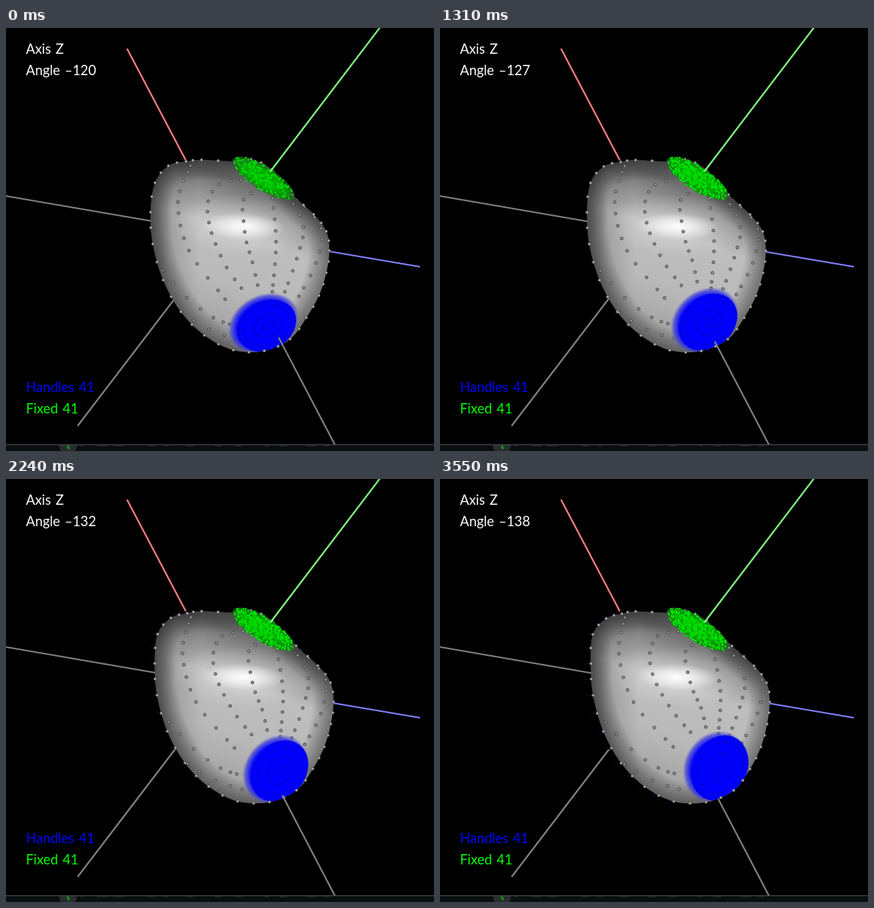
Write an HTML page with a canvas that moves like this. It is 580 by 574 pixels and loops after 3640 ms.

```html
<!DOCTYPE html>
<html lang="en">
<head>
<meta charset="utf-8">
<title>Surface deformation</title>
<style>
  html, body { margin: 0; width: 100%; height: 100%; overflow: hidden; background: #000; }
  canvas, svg { position: absolute; left: 0; top: 0; display: block; }
  text { font: 18.4px Lato, "Open Sans", sans-serif; word-spacing: 1.5px; }
</style>
</head>
<body>
<canvas id="view" width="580" height="574"></canvas>
<svg width="580" height="574">
  <text x="27" y="35" fill="#fff">Axis Z</text>
  <text x="27" y="64" fill="#fff" id="angle">Angle –120</text>
  <text x="27" y="494" fill="#00f">Handles 41</text>
  <text x="27" y="523" fill="#0f0">Fixed 41</text>
</svg>
<script>
const LOOP = 3640;
const STEPS = [70, 220, 450, 620, 850, 1080, 1310, 1460, 1630, 1860,
  2090, 2240, 2570, 2780, 2930, 3090, 3320, 3550];
const ctx = document.getElementById('view').getContext('2d');
const label = document.getElementById('angle');
const TAU = Math.PI * 2;

const OUTLINE = [
  [244, 181], [265, 179], [310, 181], [332, 178], [360, 192], [388, 226], [417, 253], [434, 276],
  [438, 302], [434, 332], [424, 363], [407, 393], [385, 422], [350, 438], [308, 437], [269, 417],
  [237, 385], [213, 342], [199, 293], [196, 250], [202, 210], [220, 187]
];
// Each row: dots per span, then the control points.
const MERIDIANS = [
  [4, [250, 187], [233, 236], [248, 302], [297, 368]],
  [2, [318, 206], [289, 212], [274, 235], [275, 264], [284, 293], [299, 325], [319, 353]],
  [2, [343, 219], [322, 233], [322, 262], [326, 291], [334, 318], [341, 349]],
  [5, [360, 222], [366, 290], [361, 358]],
  [3, [383, 228], [403, 270], [394, 313], [378, 358]],
  [3, [395, 232], [427, 272], [420, 319], [397, 364]],
  [2, [213, 329], [245, 366], [281, 393], [303, 402]],
  [2, [238, 386], [275, 409], [312, 422]]
];

const mix = (a, b, p) => a + (b - a) * p;
const bump = (x, y, cx, cy, spread) => Math.exp(-((x - cx) ** 2 + (y - cy) ** 2) / spread);

// Sideways drift that fades out toward the fixed top.
function drift(y) {
  const t = Math.max(0, Math.min(1, (y - 178) / 60));
  return 8.5 * t * t * (3 - 2 * t);
}

const outlineAt = p => OUTLINE.map(([x, y]) => [
  x + p * (drift(y) + 5 * bump(x, y, 400, 410, 3500) + 5 * bump(x, y, 225, 185, 500)),
  y + p * (0.5 + 2 * bump(x, y, 228, 186, 700))
]);

const meridianAt = (pts, p) => pts.map(([x, y]) => [
  x + p * (drift(y) + 13 * bump(x, y, 310, 335, 6000)),
  y + p * (1 - 14 * bump(x, y, 350, 355, 3200))
]);

function spline(pts, sub, closed) {
  const n = pts.length, out = [];
  const at = i => closed ? pts[(i + n) % n] : pts[Math.max(0, Math.min(n - 1, i))];
  for (let i = 0; i < (closed ? n : n - 1); i++) {
    const [a, b, c, d] = [at(i - 1), at(i), at(i + 1), at(i + 2)];
    for (let j = 0; j < sub; j++) {
      const t = j / sub;
      out.push([0, 1].map(k => b[k] + t / 2 * (c[k] - a[k]
        + t * (2 * a[k] - 5 * b[k] + 4 * c[k] - d[k]
        + t * (3 * (b[k] - c[k]) + d[k] - a[k])))));
    }
  }
  if (!closed) out.push(pts[n - 1]);
  return out;
}

function line(x1, y1, x2, y2, color, width = 2.2) {
  ctx.strokeStyle = color;
  ctx.lineWidth = width;
  ctx.beginPath();
  ctx.moveTo(x1, y1);
  ctx.lineTo(x2, y2);
  ctx.stroke();
}

function dots(pts, r, fill, rim) {
  ctx.fillStyle = fill;
  ctx.strokeStyle = rim;
  ctx.lineWidth = 0.9;
  for (const [x, y] of pts) {
    ctx.beginPath();
    ctx.arc(x, y, r, 0, TAU);
    ctx.fill();
    if (rim) ctx.stroke();
  }
}

function glow(x, y, rx, ry, rot, stops) {
  ctx.save();
  ctx.translate(x, y);
  ctx.rotate(rot);
  ctx.scale(rx, ry);
  const g = ctx.createRadialGradient(0, 0, 0, 0, 0, 1);
  stops.forEach(([at, color]) => g.addColorStop(at, color));
  ctx.fillStyle = g;
  ctx.beginPath();
  ctx.arc(0, 0, 1, 0, TAU);
  ctx.fill();
  ctx.restore();
}

function ramp(x1, y1, x2, y2, stops) {
  const g = ctx.createLinearGradient(x1, y1, x2, y2);
  stops.forEach(([at, color]) => g.addColorStop(at, color));
  ctx.fillStyle = g;
  ctx.fillRect(0, 0, 580, 574);
}

function random(seed) {
  return () => (seed = seed * 16807 % 2147483647) / 2147483647;
}

function axes() {
  line(296, 279, 164, 28, '#ff8080');
  line(296, 279, 0, 228, '#808080');
  line(296, 279, 561, 324, '#8080ff');
  line(296, 279, 97, 540, '#808080');
}

function body(p) {
  const shape = new Path2D();
  spline(outlineAt(p), 8, true).forEach(([x, y]) => shape.lineTo(x, y));
  shape.closePath();
  ctx.save();
  ctx.clip(shape);
  const s = 8 * p;
  ramp(330 + s, 185, 244 + s, 430, [[0, '#727272'], [0.1, '#6c6c6c'], [0.22, '#939393'],
    [0.36, '#bebebe'], [0.62, '#bababa'], [1, '#989898']]);
  ramp(196 + s, 0, 262 + s, 0, [[0, 'rgba(0,0,0,.36)'], [0.4, 'rgba(0,0,0,.15)'], [1, 'rgba(0,0,0,0)']]);
  ctx.strokeStyle = 'rgba(0,0,0,.035)';
  for (let w = 3; w < 56; w += 4) {
    ctx.lineWidth = w;
    ctx.stroke(shape);
  }
  glow(322, 268, 98, 42, 0.05, [[0, 'rgba(255,255,255,.45)'], [0.5, 'rgba(255,255,255,.2)'], [1, 'rgba(255,255,255,0)']]);
  glow(322, 269, 56, 18, 0.05, [[0, 'rgba(255,255,255,.95)'], [0.4, 'rgba(255,255,255,.6)'], [1, 'rgba(255,255,255,0)']]);
  MERIDIANS.forEach(([sub, ...pts]) => dots(spline(meridianAt(pts, p), sub), 1.9, '#999', '#383838'));
  handle(p);
  ctx.restore();
}

function handle(p) {
  const rot = mix(-0.5, -1.1, p);
  glow(mix(349, 374, p), mix(401, 391, p), 51, mix(39, 44, p), rot,
    [[0, '#00f'], [0.76, '#1414f4'], [0.9, 'rgba(60,60,220,.7)'], [1, 'rgba(110,110,200,0)']]);
  const x = mix(353, 379, p), y = mix(404, 392, p);
  const rx = mix(42, 46, p), ry = mix(33, 37, p);
  const cos = Math.cos(rot), sin = Math.sin(rot);
  ctx.fillStyle = '#00f';
  ctx.beginPath();
  ctx.ellipse(x, y, rx, ry, rot, 0, TAU);
  ctx.fill();
  for (const [f, n] of [[0.95, 30], [0.78, 28], [0.45, 20], [0.18, 8]]) {
    const ring = Array.from({ length: n }, (_, i) => {
      const a = i / n * TAU, u = rx * f * Math.cos(a), v = ry * f * Math.sin(a);
      return [x + 3 * (1 - f) + u * cos - v * sin, y + u * sin + v * cos];
    });
    dots(ring, 1.3, '#0000bd');
  }
}

function fixedPatch(k) {
  const cx = 349, cy = 204, rot = 0.57;
  const cos = Math.cos(rot), sin = Math.sin(rot);
  glow(cx, cy, 49, 16, rot, [[0, '#0c0'], [0.65, '#0a0'], [1, 'rgba(20,120,20,.55)']]);
  const rnd = random(71), pts = [];
  for (let i = 0; i < (k ? 480 : 210); i++) {
    const a = rnd() * TAU, d = Math.sqrt(rnd());
    const u = 47 * d * Math.cos(a), v = 16.5 * d * Math.sin(a);
    pts.push([cx + u * cos - v * sin, cy + u * sin + v * cos]);
  }
  dots(pts.filter((_, i) => i % 4 === 0), 1.3, '#009200');
  dots(pts.filter((_, i) => i % 4), 1.2, '#00e200');
}

function footer() {
  ctx.fillStyle = '#0b0e11';
  ctx.fillRect(0, 566, 580, 8);
  line(0, 565.5, 580, 565.5, '#4c4f52', 1);
  const rnd = random(9);
  for (let x = 100; x < 440; x += 18 + rnd() * 30) line(x, 567, x + 5 + rnd() * 12, 567, '#2e3033', 1);
  ctx.save();
  ctx.beginPath();
  ctx.rect(0, 566, 580, 8);
  ctx.clip();
  dots([[84, 567]], 12, '#292b2d');
  dots([[84, 568], [85, 570]], 1.7, '#159515');
  ctx.restore();
}

function draw(k) {
  const p = k / 18;
  const rim = q => spline(outlineAt(q), 2, true);
  ctx.fillStyle = '#000';
  ctx.fillRect(0, 0, 580, 574);
  axes();
  for (let j = 0; j < k; j++) dots(rim(j / 18), 1.6, '#080818');
  body(p);
  dots(rim(p), 1.7, '#bcbcbc', '#555');
  fixedPatch(k);
  line(358, 195, 507, -1, '#80ff80');
  line(mix(369.5, 377, p), mix(420, 434, p), 446, 566, '#808080');
  footer();
  label.textContent = 'Angle –' + (120 + k);
}

let shown = -1;
function tick() {
  const t = performance.now() % LOOP;
  const k = STEPS.filter(s => s <= t).length;
  if (k !== shown) draw(shown = k);
  requestAnimationFrame(tick);
}
tick();
</script>
</body>
</html>
```
